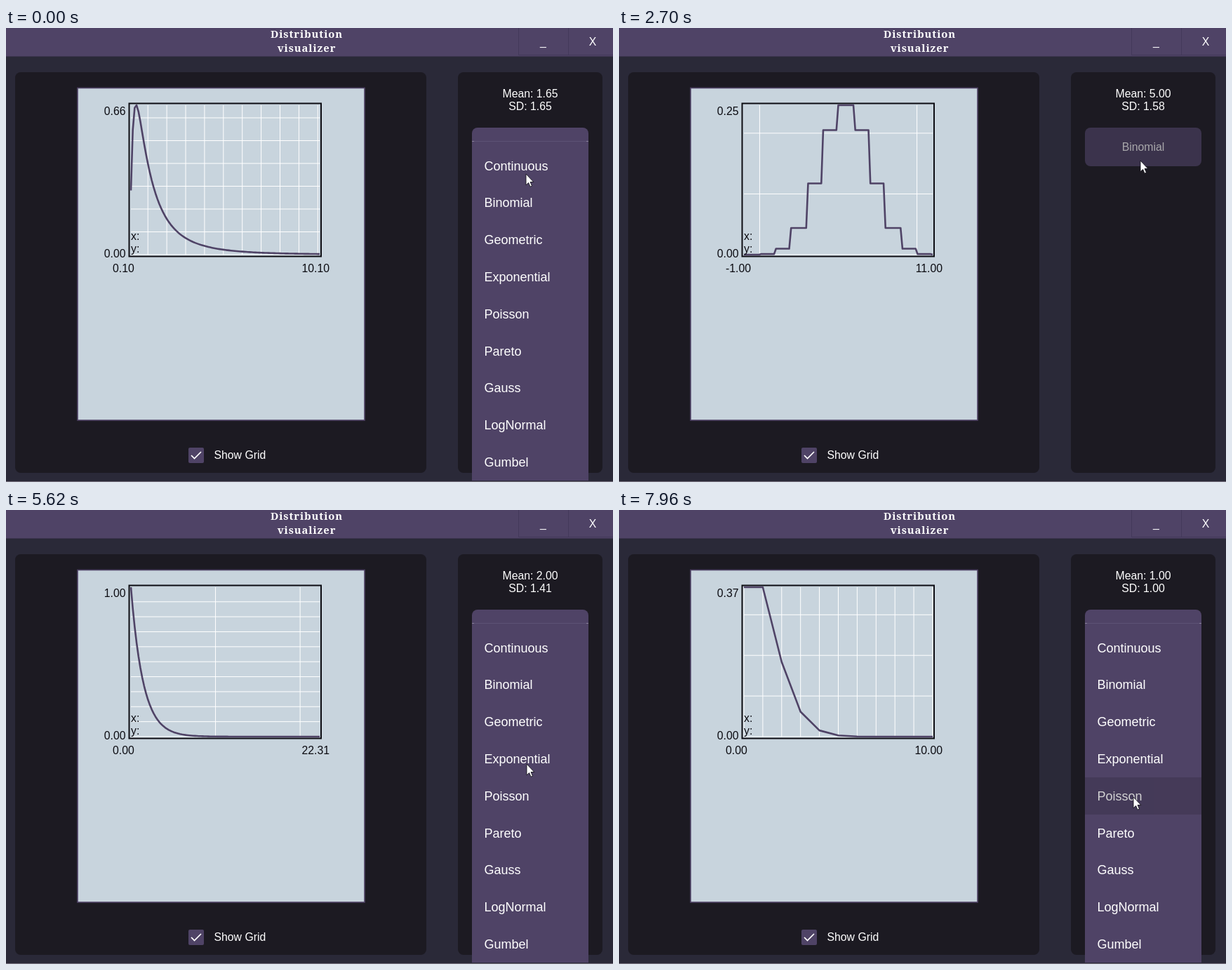
These frames come from a looping animation (865x647 px, 8 s). An HTML page:

```html
<!DOCTYPE html>
<html lang="en">
<head>
<meta charset="utf-8">
<title>Distribution visualizer</title>
<style>
  html, body { margin: 0; width: 100%; height: 100%; overflow: hidden; background: #2a2938; }
  svg { display: block; width: 865px; height: 647px; }
  text { font: 15.8px "Liberation Sans", Arial, sans-serif; fill: #fff; white-space: pre; }
  .mid { text-anchor: middle; }
  .end { text-anchor: end; }
  .title { font: bold 14.8px "Noto Serif", serif; letter-spacing: .9px; }
  .row text { font-size: 18px; }
  .plot text { fill: #0c0c12; }
  .crisp { shape-rendering: crispEdges; }
</style>
</head>
<body>
<svg viewBox="0 0 865 647">
  <rect width="865" height="647" fill="#2a2938"/>
  <rect width="865" height="40" fill="#4f4366"/>
  <path class="crisp" d="M0 40.5H865" stroke="#3c344f"/>
  <path d="M730.5 0V38.5H865M801.5 0V38.5" fill="none" stroke="#43395a"/>
  <text class="title mid" x="428.5" y="14">Distribution</text>
  <text class="title mid" x="428.5" y="34">visualizer</text>
  <text class="mid" x="765.5" y="24.5">_</text>
  <text class="mid" x="836" y="25">X</text>

  <rect x="13" y="63" width="586" height="571" rx="8" fill="#1c1a22"/>
  <rect x="644" y="63" width="206" height="571" rx="8" fill="#1c1a22"/>
  <path class="crisp" d="M0 646.5H865" stroke="#77727f"/>

  <g class="plot">
    <rect x="102" y="85.5" width="409" height="473.5" fill="#c8d4dd" stroke="#4f4366" stroke-width="1.6"/>
    <path id="grid" fill="none" stroke="#fff"/>
    <rect x="175.5" y="107.5" width="273.5" height="218" fill="none" stroke="#0c0c12" stroke-width="2"/>
    <path id="curve" fill="none" stroke="#4f4366" stroke-width="2.6" stroke-linejoin="round"/>
    <text id="top" class="end" x="170.5" y="124.4"></text>
    <text class="end" x="170.5" y="327">0.00</text>
    <text id="from" x="152" y="348"></text>
    <text id="to" class="end" x="461" y="348"></text>
    <text x="178" y="302">x:</text>
    <text x="178" y="320">y:</text>
  </g>

  <rect x="260" y="598" width="22" height="22" rx="2" fill="#4f4366"/>
  <path d="M264 609L268.5 613.5L278 604" fill="none" stroke="#fff" stroke-width="1.7"/>
  <text x="296.5" y="613.5">Show Grid</text>

  <text id="mean" class="mid" x="747" y="99"></text>
  <text id="sd" class="mid" x="747" y="117"></text>
  <g id="button">
    <rect x="664" y="142" width="166" height="55" rx="8" fill="#4f4366"/>
    <text id="label" class="mid" x="747" y="175"></text>
  </g>
  <g id="list">
    <rect class="crisp" x="664" y="161" width="166" height="9" fill="#4f4366"/>
    <path class="crisp" d="M664 161.5H830" stroke="#5d5275"/>
    <path class="crisp" d="M664 161.5H667M827 161.5H830" stroke="#8a829a"/>
  </g>
  <path id="cursor" d="M0 0V15.8L3.6 12.5L6 18.2L8.5 17.1L6.1 11.5H10.8Z" fill="#fff" stroke="#15131c" stroke-width=".9"/>
</svg>
<script>
const $ = id => document.getElementById(id);
const LOOP = 8000, STEP = 137;
const CLOSE = 265, ARRIVE = 540; // after a pick: list closes, pointer is on the button

const fact = k => k < 2 ? 1 : k * fact(k - 1);
const poisson = x => Math.exp(-1) / fact(Math.round(x));
const binomial = x => {
  const k = Math.floor(x + 1e-9);
  return k < 0 || k > 10 ? 0 : fact(10) / fact(k) / fact(10 - k) / 1024;
};
const logNormal = x => Math.exp(-(Math.log(x) ** 2) / 2) / (x * Math.sqrt(2 * Math.PI));

// item, button: pointer places; reach, pick, press, open: times
const charts = [
  { name: "LogNormal", f: logNormal, range: [.1, 10.1], mean: 1.65, sd: 1.65 },
  { name: "Continuous", f: x => x >= 1 && x <= 2 ? 1 : 0, range: [0, 3], mean: 1.5, sd: .29,
    item: [741, 208], button: [744, 186], pick: 150, press: 710, open: 990 },
  { name: "Binomial", f: binomial, range: [-1, 11], mean: 5, sd: 1.58,
    item: [741, 263], button: [743, 189], reach: 1490, pick: 1880, press: 2700, open: 2976 },
  { name: "Geometric", f: x => .5 ** x, range: [.004, 22.31], mean: 2, sd: Math.SQRT2,
    item: [738, 304], button: [741, 180], reach: 3390, pick: 3820, press: 4660, open: 4950 },
  { name: "Exponential", f: x => Math.exp(-x), range: [.2, 20.2], mean: 1, sd: 1,
    item: [742, 362], button: [745, 173], reach: 5620, pick: 5930, press: 6538, open: 6810 },
  { name: "Poisson", f: poisson, range: [0, 10], samples: 10, mean: 1, sd: 1,
    item: [733, 409], reach: 7808, pick: 7960 }
];

const rows = ["Continuous", "Binomial", "Geometric", "Exponential", "Poisson",
  "Pareto", "Gauss", "LogNormal", "Gumbel"].map((name, i) => {
  const edge = k => Math.min(646, Math.round(169.8 + 52.8 * k));
  const g = document.createElementNS("http://www.w3.org/2000/svg", "g");
  g.setAttribute("class", "row");
  g.innerHTML = `<rect x="664" y="${edge(i)}" width="166" height="${edge(i + 1) - edge(i)}" fill="#4f4366"/>` +
    `<text x="681.5" y="${202.5 + 52.8 * i}">${name}</text>`;
  $("list").append(g);
  return g;
});

const LEFT = 178, WIDTH = 269, BASE = 323, HEIGHT = 213;
const decade = v => 10 ** Math.floor(Math.log10(v));

function drawChart({ name, f, range: [x0, x1], samples = 100, mean, sd }) {
  const xs = Array.from({ length: samples + 1 }, (_, i) => x0 + (x1 - x0) * i / samples);
  const ys = xs.map(f);
  const max = Math.max(...ys);
  const px = x => (LEFT + WIDTH * (x - x0) / (x1 - x0)).toFixed(2);
  const py = y => (BASE - HEIGHT * y / max).toFixed(2);
  const gx = decade(x1 - x0 - .01), gy = decade(max);
  let grid = "";
  for (let k = Math.ceil(x0 / gx); k * gx <= x1; k++) grid += `M${px(k * gx)} ${BASE}v${-HEIGHT}`;
  for (let k = 0; k * gy <= max; k++) grid += `M${LEFT} ${py(k * gy)}h${WIDTH}`;
  $("grid").setAttribute("d", grid);
  $("curve").setAttribute("d", "M" + xs.map((x, i) => px(x) + " " + py(ys[i])).join("L"));
  $("top").textContent = max.toFixed(2);
  $("from").textContent = x0.toFixed(2);
  $("to").textContent = x1.toFixed(2);
  $("mean").textContent = "Mean: " + mean.toFixed(2);
  $("sd").textContent = "SD: " + sd.toFixed(2);
  $("label").textContent = name;
}

// eased move in screen-refresh steps
function glide(a, b, t, t0, t1) {
  const n = Math.round((t1 - t0) / STEP);
  const u = Math.floor(n * Math.min(1, Math.max(0, (t - t0) / (t1 - t0)))) / n;
  return a.map((v, i) => v + (b[i] - v) * u * (2 - u));
}

function pointer(t, now, next) {
  if (!now.item) return next.item;
  if (!next) return now.item;
  return t < now.open
    ? glide(now.item, now.button, t, now.pick + CLOSE, now.pick + ARRIVE)
    : glide(now.button, next.item, t, now.open, next.reach);
}

let shown = -1;
function draw(t) {
  const index = charts.filter(c => c.pick <= t).length;
  const now = charts[index];
  if (index !== shown) drawChart(charts[shown = index]);

  const { pick, press, open } = now;
  const closed = t >= pick + CLOSE && t < open;
  const pressed = t >= press && t < open;
  const fade = t < pick + STEP ? .8 : .6;
  $("list").style.display = closed ? "none" : "";
  $("label").style.display = closed ? "" : "none";
  $("button").style.opacity = !pressed ? 1 : t < press + 115 ? .62 : .9;
  rows.forEach((g, i) => g.style.opacity = i === index - 1 && t < pick + CLOSE ? fade : 1);
  $("cursor").setAttribute("transform", `translate(${pointer(t, now, charts[index + 1])})`);
}

const start = performance.now();
function frame() {
  draw((performance.now() - start) % LOOP);
  requestAnimationFrame(frame);
}
frame();
</script>
</body>
</html>
```
